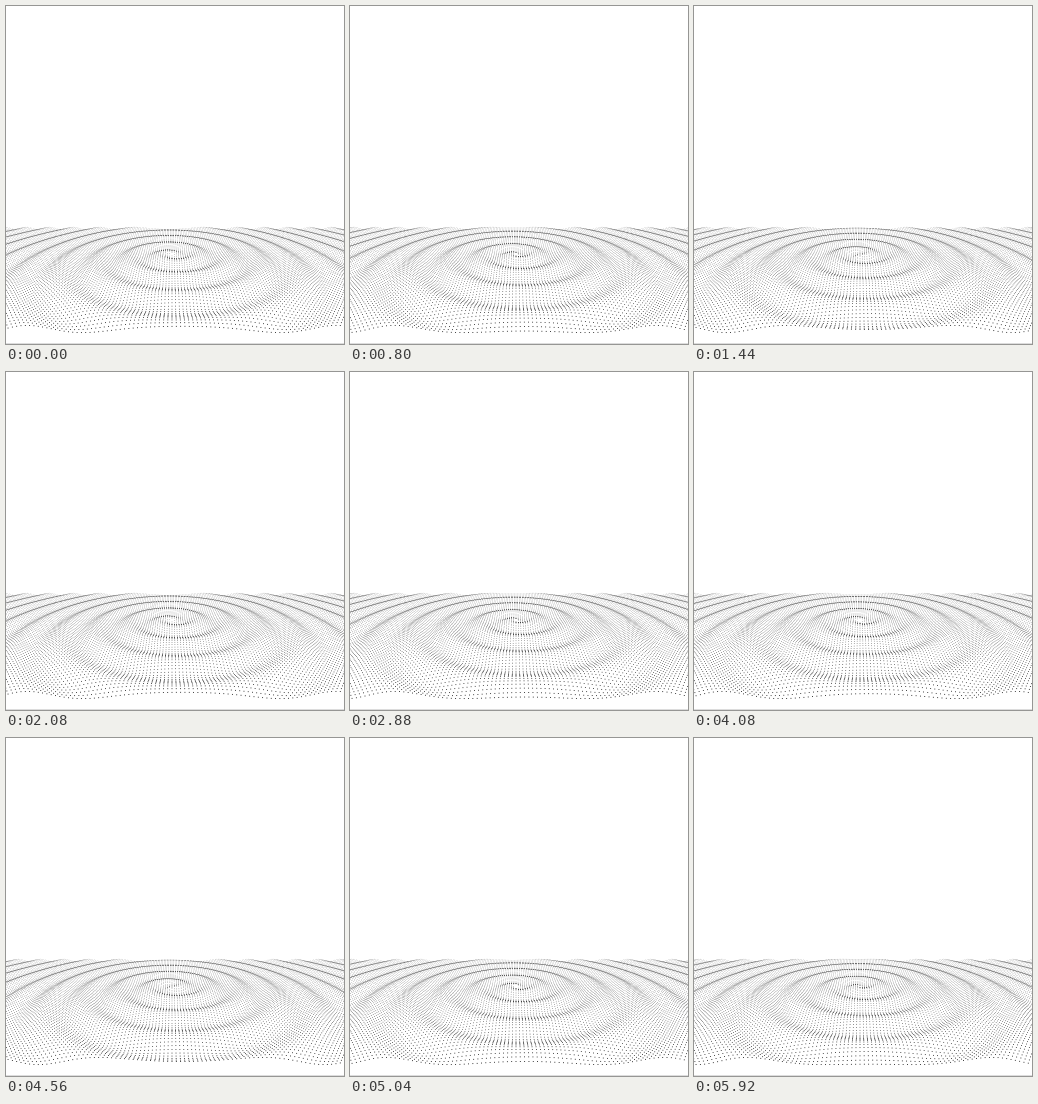
These frames come from a looping animation (338 by 338 pixels, 6000 ms). An HTML page with a canvas:

```html
<!DOCTYPE html>
<html lang="en">
<head>
<meta charset="utf-8">
<title>Spiral dot wave</title>
<style>
  html, body { margin: 0; width: 100%; height: 100%; overflow: hidden; background: #fff; }
  canvas { display: block; width: 100vw; height: 100vh; }
</style>
</head>
<body>
<canvas id="stage" width="338" height="338"></canvas>
<script>
const SIZE = 338;
const LOOP = 6000;
const STEP = 80;
const PERIOD = 1040;

// Level camera: depths are in units of the nearest row.
const MID_X = 166;
const HORIZON = SIZE / 2;
const FOCAL = 226;
const DROP = 154;
const NEAR = 1;
const FAR = 2.89;
const CENTER = (NEAR + FAR) / 2;
const ROWS = 100;
const HALF_COLS = 120;
const GAP = (FAR - NEAR) / (ROWS - 1);

const WAVE = 0.25;
const BAND = 0.853;
const HEIGHT = 3.6;
const DOT = 0.86;

const ctx = document.getElementById('stage').getContext('2d');
const TAU = Math.PI * 2;

// Each visible dot keeps its screen place and its phase on the spiral.
const dots = [];
for (let row = 0; row < ROWS; row++) {
  const z = FAR - GAP * row;
  for (let col = -HALF_COLS; col <= HALF_COLS; col++) {
    const x = col * GAP;
    const sx = MID_X + FOCAL * x / z;
    if (sx < -1 || sx > SIZE + 1) continue;
    const toward = CENTER - z;
    const phase = TAU * (Math.hypot(x, toward) - BAND) / WAVE - Math.atan2(x, toward);
    dots.push({ sx, sy: HORIZON + DROP / z, lift: HEIGHT / z, size: DOT / z, phase });
  }
}

function draw(time) {
  const turn = TAU * time / PERIOD;
  ctx.fillStyle = '#fff';
  ctx.fillRect(0, 0, SIZE, SIZE);
  ctx.fillStyle = '#000';
  for (const d of dots) {
    const y = d.sy - d.lift * Math.sin(d.phase - turn);
    ctx.fillRect(d.sx - d.size / 2, y - d.size / 2, d.size, d.size);
  }
  ctx.fillStyle = '#dcdcdc';
  ctx.fillRect(0, SIZE - 1, SIZE, 1);
}

let shown = -1;
function tick() {
  const time = Math.floor(performance.now() % LOOP / STEP) * STEP;
  if (time !== shown) draw(shown = time);
  requestAnimationFrame(tick);
}
tick();
</script>
</body>
</html>
```
